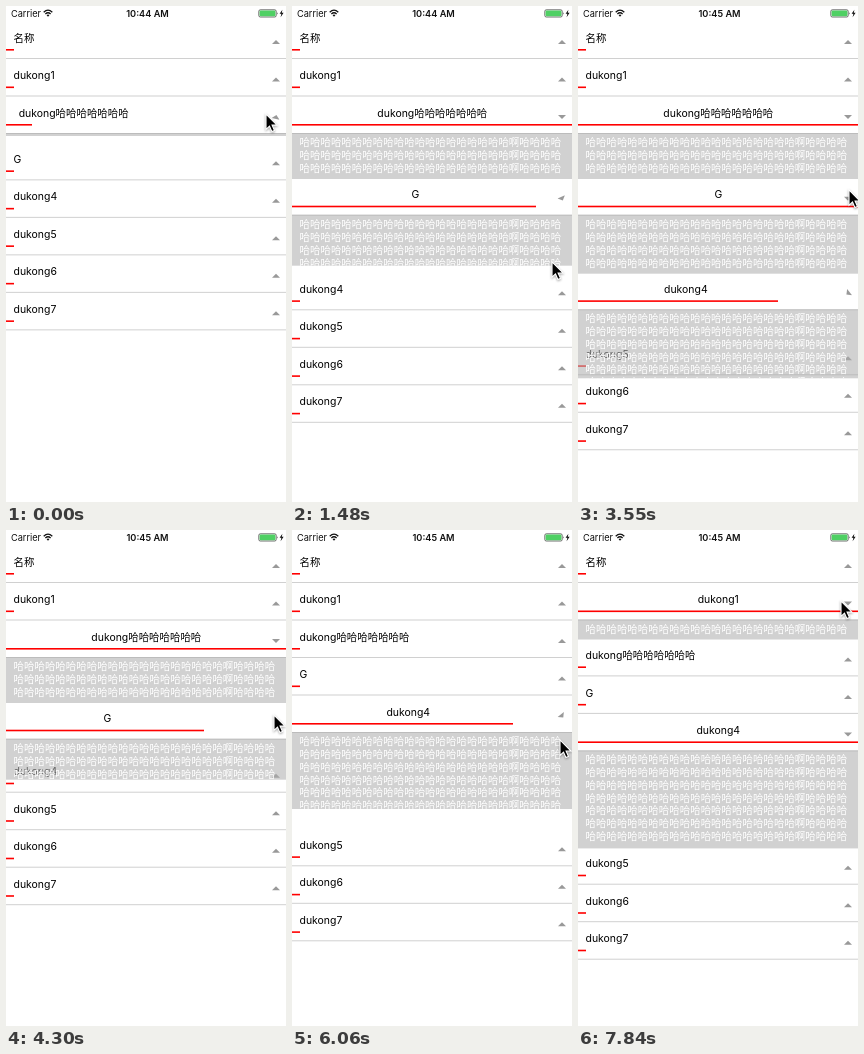
Write an HTML page that moves like this. It is 280 px wide and 496 px high and loops after 8000 ms.

```html
<!DOCTYPE html>
<html lang="zh">
<head>
<meta charset="utf-8">
<title>Expandable list</title>
<style>
  html, body { margin: 0; width: 100%; height: 100%; overflow: hidden; background: #fff; }
  #stage {
    position: absolute; left: 0; top: 0; width: 280px; height: 496px; overflow: hidden;
    background: #fff; color: #000;
    font: 10.45px Inter, "Noto Sans CJK SC", "Noto Sans CJK", sans-serif;
  }
  #stage div, #stage svg { position: absolute; white-space: pre; }
  .status { top: 0; line-height: 15px; font-size: 9.2px; color: #111; }
  #clock { left: 0; width: 283px; text-align: center; font-weight: 600; }
  .row { left: 0; top: 0; width: 280px; height: 37px; }
  .title { top: 0; line-height: 14px; }
  .bar { left: 0; top: 28px; height: 2px; background: #f00; transform: scaleY(.8); transform-origin: top; }
  .line { left: 0; top: 37px; width: 280px; height: 1px; background: #d0d0d0; }
  .arrow { left: 266px; top: 17px; width: 8px; height: 8px; fill: #999; }
  .body {
    left: 0; top: 37px; width: 280px; overflow: hidden;
    background: rgba(175, 175, 175, .57); color: #fff; font-size: 10.48px;
  }
  .body div { left: 7.5px; top: 4px; line-height: 12.85px; }
  #cursor { left: 0; top: 0; z-index: 20; width: 20px; height: 24px; overflow: visible; }
</style>
</head>
<body>
<div id="stage">
  <div class="status" style="left:5px">Carrier</div>
  <svg style="left:37px;top:3px" width="10" height="9" viewBox="0 0 10 9" fill="none" stroke="#111" stroke-width="1.3">
    <path d="M.7 3.2Q5-.9 9.3 3.2M2.4 5Q5 2.6 7.6 5"/>
    <path d="M3.6 6.2Q5 5 6.4 6.2L5 7.8Z" fill="#111" stroke="none"/>
  </svg>
  <div class="status" id="clock"></div>
  <svg style="left:252px;top:3px" width="28" height="9" viewBox="0 0 28 9">
    <rect x=".8" y=".8" width="17.4" height="7.2" rx="1.5" fill="#fff" stroke="#333" stroke-width=".7"/>
    <rect x="1.6" y="1.6" width="15.8" height="5.6" rx=".8" fill="#4fd064"/>
    <path d="M19 3.2Q20.3 4.4 19 5.6Z" fill="#333"/>
    <path d="M24.4 .7L21.6 4.8H23.4L22.6 8.2L25.6 3.8H23.8Z" fill="#111"/>
  </svg>
  <svg id="cursor" viewBox="0 0 20 24">
    <path d="M0 0V15.4L3.5 12.1L5.9 17.6L8.5 16.5L6.1 11.1H11Z" fill="#000" stroke="#fff" stroke-width="1.1"
      style="filter:drop-shadow(0 1px 1px rgba(0,0,0,.35))"/>
  </svg>
</div>
<script>
const LOOP = 8000, TICK = 147.95, LAST_TICK = 53;
const ROW = 37.5, TOP = 15, OPEN_TIME = 300;
const ha = n => '哈'.repeat(n);
const sentence = ha(20) + '啊' + ha(4);

// toggles: times at which the row alternately opens and closes
const rows = [
  { title: '名称' },
  { title: 'dukong1', lines: 1, toggles: [7250] },
  { title: 'dukong' + ha(7), lines: 3, toggles: [-20, 4900] },
  { title: 'G', lines: 4, toggles: [1219, 4200] },
  { title: 'dukong4', lines: 7, toggles: [2137, 3463, 5831] },
  { title: 'dukong5' },
  { title: 'dukong6' },
  { title: 'dukong7' }
];

// time, x, y of the pointer tip
const path = [
  [0, 260, 108], [450, 263, 113], [1050, 267, 185], [1219, 266, 189], [1480, 260, 256],
  [1900, 266, 283], [2220, 265, 281], [2800, 267, 284], [3110, 266, 282], [3400, 267, 281],
  [3550, 271, 184], [3750, 270, 170], [4000, 268, 185], [4300, 268, 185], [4800, 269, 111],
  [5030, 268, 121], [5320, 268, 179], [5750, 267, 180], [6060, 268, 210], [6510, 268, 208],
  [6900, 265, 121], [7250, 263, 74], [7690, 263, 71], [8000, 263, 71]
];

const stage = document.getElementById('stage');
const clock = document.getElementById('clock');
const cursor = document.getElementById('cursor');
const clamp = v => Math.max(0, Math.min(1, v));

function add(parent, cls, text = '') {
  const el = document.createElement('div');
  el.className = cls;
  el.textContent = text;
  parent.appendChild(el);
  return el;
}

rows.forEach((row, i) => {
  row.el = add(stage, 'row');
  row.el.style.zIndex = rows.length - i; // open bodies cover the rows below
  add(row.el, 'line');
  row.text = add(row.el, 'title', row.title);
  row.bar = add(row.el, 'bar');
  row.el.insertAdjacentHTML('beforeend',
    '<svg class="arrow" viewBox="0 0 8 8"><path d="M0 6L4 2L8 6Z"/></svg>');
  row.arrow = row.el.lastChild;
  if (row.lines) {
    row.body = add(row.el, 'body');
    add(row.body, '', Array(row.lines).fill(sentence).join('\n'));
    row.extra = 12.9 * row.lines + 5.5;
  }
});

// open: linear reveal; room: space made below, which settles sooner
function stateAt(row, t) {
  let open = 0, room = 0, angle = 0;
  (row.toggles || []).forEach((start, i) => {
    if (t < start) return;
    const p = clamp((t - start) / OPEN_TIME);
    const q = 1 - (1 - clamp(p / .63)) ** 2;
    const closing = i % 2;
    open = closing ? 1 - p : p;
    room = closing ? 1 - q : q;
    angle = 180 * (p + closing);
  });
  return { open, room, angle };
}

function pointerAt(t) {
  const i = Math.max(1, path.findIndex(k => k[0] >= t));
  const [a, b] = [path[i - 1], path[i]];
  const u = clamp((t - a[0]) / (b[0] - a[0]));
  return [a[1] + (b[1] - a[1]) * u, a[2] + (b[2] - a[2]) * u];
}

function draw(t) {
  let y = TOP;
  for (const row of rows) {
    const { open, room, angle } = stateAt(row, t);
    row.el.style.transform = `translateY(${y}px)`;
    row.text.style.transform = `translate(${7.5 + 132.8 * open}px, 10.6px) translateX(${-50 * open}%)`;
    row.bar.style.width = 7.5 + 272.5 * open + 'px';
    row.arrow.style.transform = `rotate(${angle}deg)`;
    if (row.body) row.body.style.height = (row.extra + 2) * open + 'px';
    y += ROW + (row.extra || 0) * room;
  }
  clock.textContent = t < 1780 ? '10:44 AM' : '10:45 AM';
  const [px, py] = pointerAt(t);
  cursor.style.transform = `translate(${px}px, ${py}px)`;
}

const begin = performance.now();
function frame() {
  const t = (performance.now() - begin) % LOOP;
  draw(Math.min(LAST_TICK, Math.floor((t + 8) / TICK)) * TICK);
  requestAnimationFrame(frame);
}
frame();
</script>
</body>
</html>
```
